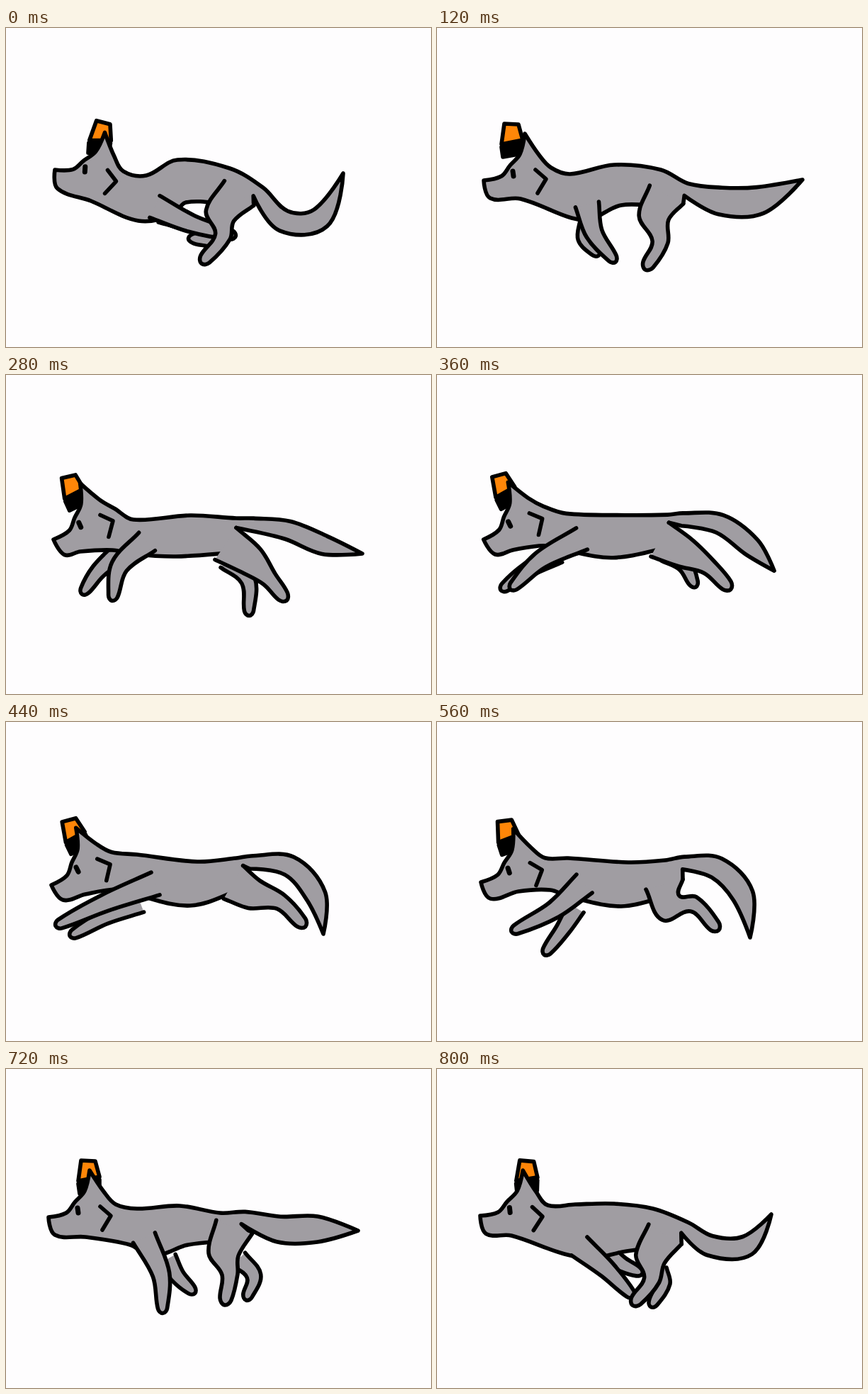
Write an HTML page that moves like this. It is 600x450 px and loops after 840 ms.

```html
<!DOCTYPE html>
<html lang="en">
<head>
<meta charset="utf-8">
<title>Running fox</title>
<style>
  html, body { margin: 0; width: 100%; height: 100%; overflow: hidden; background: #fefdfe; }
  svg { display: block; width: 600px; height: 450px; }
  path { fill: #a09da2; stroke: #000; stroke-width: 5.6; stroke-linecap: round; stroke-linejoin: round; }
  #hat { fill: #ff8608; }
  #band { fill: #000; }
  #cheek, #eye { fill: none; }
  #eye { stroke-width: 7; }
</style>
</head>
<body>
<svg viewBox="0 0 600 450">
  <path id="farHind"/><path id="farFront"/>
  <path id="hat"/><path id="band"/>
  <path id="body"/>
  <path id="nearFront"/><path id="nearHind"/>
  <path id="cheek"/><path id="eye"/>
</svg>
<script>
const STEP = 40, LOOP = 840, DRAWINGS = 20, HELD = 11;

// Rigid head, relative to the nose: chin, nose, bridge, brow, ear, neck.
const HEAD = [[9, 25], [0, 0], [25, -6], [37, -21], [51, -37], [58, -66], [78, -36], [95, -18]];
const EYE = [[41, -13], [42, -6]];
const CHEEK = [[73, -15], [88, -2], [76, 18]];
const HAT = [[46, -80], [66, -79], [72, -57], [42, -51]];
const BAND = [[42, -47], [72, -53], [72, -38], [44, -33]];
const NOSE = 1, EAR = 5;

// Half widths at the joints of a limb.
const FRONT = [17, 12, 6.5], HIND = [27, 21, 11, 8], FAR = [13, 10, 6.5];

// Skeleton at a drawing number. head: nose x, y, pitch in degrees, hat shift.
// torso: belly, chest, throat. Limbs and tail: joints from the body outwards.
const poses = [
  { at: 0, head: [69, 200, -12, -3], torso: [254,246, 187,272, 120,244], back: [198,208, 242,186, 316,198],
    tail: [356,231, 392,272, 444,268, 476,205], fluff: [15],
    nearFront: [210,252, 262,276, 318,292], nearHind: [329,233, 302,265, 306,294, 281,326],
    farFront: [220,262, 245,272, 262,281], farHind: [300,297, 280,297, 264,297] },
  { at: 3, head: [66, 215, 0, -17], torso: [260,250, 190,268, 118,241], back: [188,206, 250,193, 316,200],
    tail: [352,228, 400,244, 456,243, 516,214], fluff: [19],
    nearFront: [212,249, 222,290, 248,325], nearHind: [324,235, 306,268, 315,302, 298,334],
    farFront: [215,272, 209,297, 224,316], farHind: [305,262, 308,275, 314,290] },
  { at: 7, head: [67, 232, 16, -11], torso: [240,256, 150,247, 105,249], back: [180,204, 260,198, 325,202],
    tail: [348,211, 398,219, 450,240, 503,252], fluff: [13],
    nearFront: [199,235, 160,270, 151,312], nearHind: [310,238, 346,262, 372,288, 391,312],
    farFront: [158,252, 130,277, 111,304], farHind: [312,262, 342,290, 343,333] },
  { at: 11, head: [64, 230, 18, -4], torso: [260,259, 155,236, 112,243], back: [185,187, 270,197, 325,192],
    tail: [345,198, 400,203, 438,246, 448,299], fluff: [14],
    nearFront: [211,228, 140,255, 76,285], nearHind: [321,226, 350,243, 388,254, 417,283],
    farFront: [190,256, 140,275, 96,299], farHind: [335,240, 352,244, 375,249] },
  { at: 13, head: [62, 226, 10, -8], torso: [260,260, 160,237, 115,239], back: [185,192, 270,198, 322,195],
    tail: [348,199, 395,206, 432,245, 442,304], fluff: [15],
    nearFront: [208,228, 165,265, 111,293], nearHind: [321,229, 330,262, 362,257, 392,288],
    farFront: [196,262, 178,292, 155,323], farHind: [322,240, 328,252, 332,262] },
  { at: 17, head: [60, 209, 0, 0], torso: [257,248, 175,248, 112,237], back: [185,197, 245,193, 302,203],
    tail: [335,210, 385,226, 440,226, 497,228], fluff: [18],
    nearFront: [195,238, 219,290, 221,338], nearHind: [322,223, 307,262, 316,290, 310,325],
    farFront: [228,268, 242,292, 262,312], farHind: [328,268, 350,292, 341,320] },
  { at: 19, head: [61, 207, -2, 7], torso: [262,258, 180,261, 105,235], back: [195,191, 250,190, 305,197],
    tail: [350,224, 385,249, 438,249, 472,205], fluff: [14],
    nearFront: [201,250, 240,283, 273,317], nearHind: [322,233, 301,268, 303,298, 281,327],
    farFront: [242,262, 262,276, 284,286], farHind: [312,285, 319,302, 305,330] }
];

const bones = Object.keys(poses[0]).filter(k => k !== 'at');
const pairs = v => v.flatMap((x, i) => i % 2 ? [] : [[x, v[i + 1]]]);
const fix = p => p.map(n => n.toFixed(1)).join(' ');
const middle = (a, b) => [(a[0] + b[0]) / 2, (a[1] + b[1]) / 2];
const line = pts => 'M' + pts.map(fix).join(' L');
const set = (id, d) => document.getElementById(id).setAttribute('d', d);

// Unit direction of a polyline at point i.
function heading(pts, i) {
  const a = pts[Math.max(i - 1, 0)], b = pts[Math.min(i + 1, pts.length - 1)];
  const dx = b[0] - a[0], dy = b[1] - a[1], len = Math.hypot(dx, dy) || 1;
  return [dx / len, dy / len];
}

// Smooth open path; it turns sharply at the given corners.
function curve(pts, corners = []) {
  const dir = pts.map((p, i) => corners.includes(p) ? [0, 0] : heading(pts, i));
  let d = 'M' + fix(pts[0]);
  for (let i = 1; i < pts.length; i++) {
    const a = pts[i - 1], b = pts[i];
    const h = Math.hypot(b[0] - a[0], b[1] - a[1]) * 0.34;
    const c1 = a.map((n, k) => n + dir[i - 1][k] * h);
    const c2 = b.map((n, k) => n - dir[i][k] * h);
    d += ' C' + [c1, c2, b].map(fix).join(' ');
  }
  return d;
}

function side(joints, widths, sign) {
  return joints.map(([x, y], i) => {
    const [dx, dy] = heading(joints, i), w = sign * widths[i];
    return [x + dy * w, y - dx * w];
  });
}

// Outline of a limb: one edge, rounded paw, other edge.
function limb(joints, widths) {
  const last = joints.length - 1, dir = heading(joints, last);
  const paw = joints[last].map((n, k) => n + dir[k] * widths[last]);
  return [...side(joints, widths, -1), paw, ...side(joints, widths, 1).reverse()];
}

// Key pose by running index, wrapping around the loop.
function key(i) {
  const n = poses.length, turn = Math.floor(i / n), pose = poses[i - turn * n];
  return { at: pose.at + turn * DRAWINGS, pose };
}

function tween(name, i, at) {
  const [p, a, b, q] = [i - 1, i, i + 1, i + 2].map(key);
  const span = b.at - a.at, s = (at - a.at) / span, s2 = s * s, s3 = s2 * s;
  return a.pose[name].map((v, k) => {
    const w = b.pose[name][k];
    const m = 0.7 * span * (w - p.pose[name][k]) / (b.at - p.at);
    const n = 0.7 * span * (q.pose[name][k] - v) / (q.at - a.at);
    return (2 * s3 - 3 * s2 + 1) * v + (s3 - 2 * s2 + s) * m
      + (3 * s2 - 2 * s3) * w + (s3 - s2) * n;
  });
}

function draw(ms) {
  let at = Math.floor((ms % LOOP) / STEP);
  if (at > HELD) at--;
  let i = poses.length - 1;
  while (poses[i].at > at) i--;

  const b = Object.fromEntries(bones.map(name => [name, tween(name, i, at)]));
  const [nx, ny, pitch, shift] = b.head;
  const c = Math.cos(pitch * Math.PI / 180), s = Math.sin(pitch * Math.PI / 180);
  const place = (pts, dx = 0) => pts.map(([x, y]) =>
    [nx + (x + dx) * c + y * s, ny - (x + dx) * s + y * c]);

  const front = pairs(b.nearFront), hind = pairs(b.nearHind);
  const head = place(HEAD), hindEdge = limb(hind, HIND);
  const tailJoints = pairs(b.tail), tip = tailJoints[3], w = b.fluff[0];
  const widths = [9, w, w, 0];
  const top = side(tailJoints, widths, 1).slice(0, 3);
  const under = side(tailJoints, widths, -1).slice(0, 3).reverse();
  const [belly, chest, throat] = pairs(b.torso);

  const body = [
    middle(hind[0], hind[1]), belly, middle(front[0], front[1]), chest, throat,
    ...head, ...pairs(b.back), ...top, tip, ...under, hindEdge.at(-1)
  ];
  set('body', curve(body, [head[NOSE], head[EAR], tip, under[2]]));
  set('nearFront', curve(limb(front, FRONT)));
  set('nearHind', curve(hindEdge));
  set('farFront', curve(limb(pairs(b.farFront), FAR)));
  set('farHind', curve(limb(pairs(b.farHind), FAR)));
  set('hat', line(place(HAT, shift)) + ' Z');
  set('band', line(place(BAND, shift)) + ' Z');
  set('cheek', line(place(CHEEK)));
  set('eye', line(place(EYE)));
}

const start = performance.now();
function tick() {
  draw(performance.now() - start);
  requestAnimationFrame(tick);
}
tick();
</script>
</body>
</html>
```
